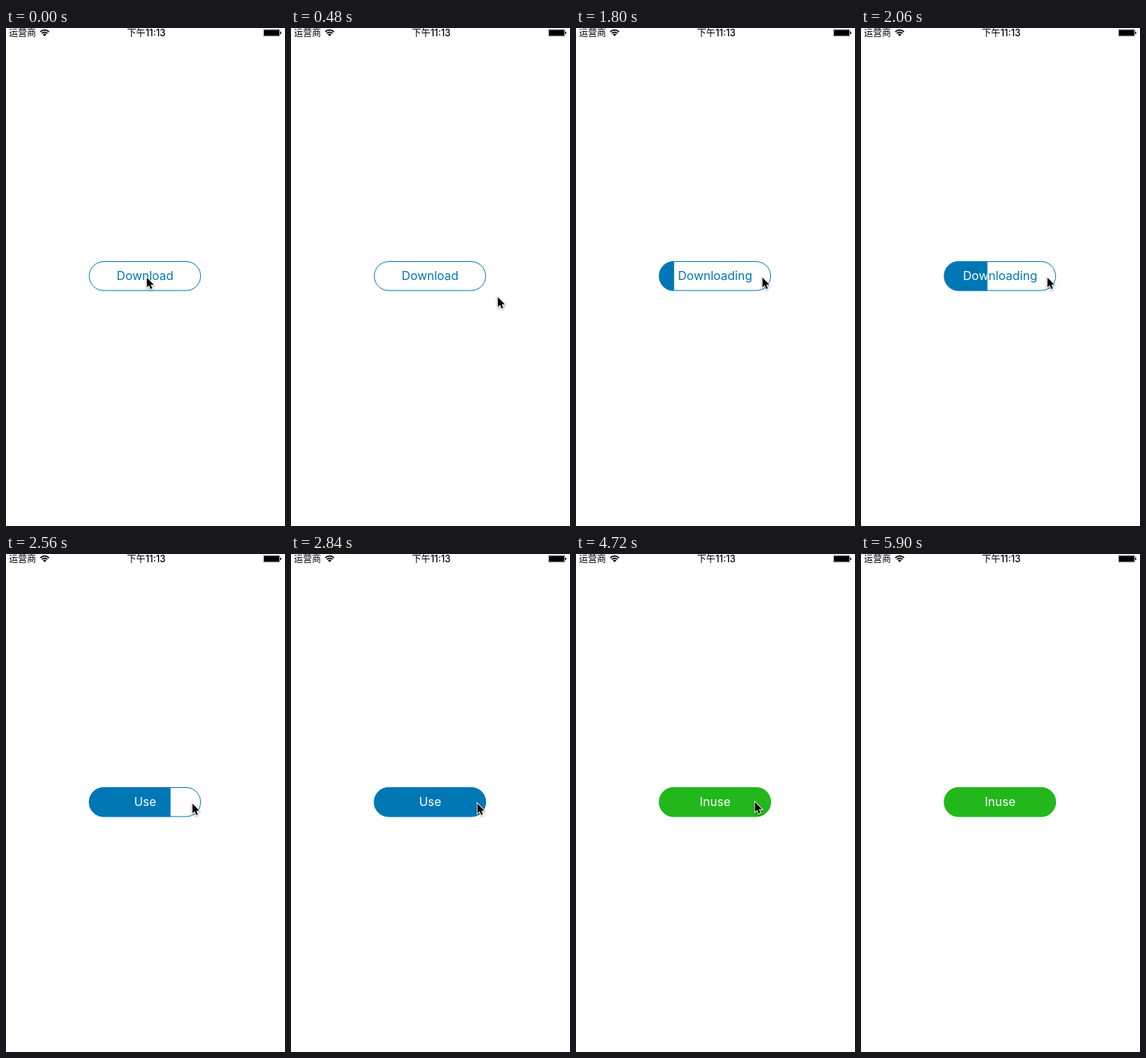
Write an HTML page with a canvas that moves like this. It is 372x662 px and loops after 6640 ms.

```html
<!DOCTYPE html>
<html lang="zh">
<head>
<meta charset="utf-8">
<style>
  html, body { margin: 0; width: 100%; height: 100%; overflow: hidden; background: #fff; }
  canvas { display: block; }
</style>
</head>
<body>
<canvas id="stage" width="372" height="662"></canvas>
<script>
const ctx = document.getElementById('stage').getContext('2d');
const LOOP = 6640, STEP = 20;
const BLUE = '#0077b5', GREEN = '#22b81c';
const SANS = 'Inter, "Noto Sans CJK SC", "Noto Sans CJK", sans-serif';
const LEFT = 110.5, TOP = 310, WIDTH = 149.5, HEIGHT = 39.5;
const ARROW = new Path2D('M0 0V13L3 10.3 5 15.2 7.2 14.3 5.2 9.5H9.3Z');

const { PI, sin, cos, min, max } = Math;
const between = (t, from, to) => min(1, max(0, (t - from) / (to - from)));

// The pointer sways, darts across the button, drops below it, then leaves.
function pointerAt(t) {
  const sway = min(t, 1046) * 2 * PI / 809;
  const dip = sin(PI * between(t, 0, 600));
  const dart = between(t, 3520, 3700), arc = sin(PI * dart);
  const drop = between(t, 5200, 5300);
  const exit = between(t, 5620, 5740);
  return [
    235.8 - 48 * cos(sway) - 10 * dart - 55 * arc - 3 * drop + 142 * exit,
    331.8 + 44 * dip - 2 * dart - 14 * arc + 35 * drop - 77 * exit
  ];
}

// Quick start, soft landing
const easeOut = k => 1 - (1 - k) ** 2.25;

function stateAt(t) {
  if (t < 1660) return ['Download', 0, BLUE];
  if (t < 2340) return ['Downloading', (min(t, 2300) - 1660) / 1030, BLUE];
  if (t < 4680) return ['Use', easeOut(between(t, 2340, 2840)), BLUE];
  return ['Inuse', 1, GREEN];
}

function text(str, x, y, font, color, align) {
  ctx.font = font + ' ' + SANS;
  ctx.fillStyle = color;
  ctx.textAlign = align;
  ctx.fillText(str, x, y);
}

function pill(inset) {
  ctx.beginPath();
  ctx.roundRect(LEFT + inset, TOP + inset, WIDTH - 2 * inset, HEIGHT - 2 * inset, HEIGHT / 2 - inset);
}

function drawStatusBar() {
  text('运营商', 4, 11, '12px', '#000', 'left');
  text('下午11:13', 187, 11, '500 12.4px', '#000', 'center');

  // Signal: a wedge cut into bands
  for (const [r, color] of [[9, '#000'], [7.2, '#fff'], [6, '#000'], [4.3, '#fff'], [3.2, '#000']]) {
    ctx.fillStyle = color;
    ctx.beginPath();
    ctx.moveTo(51.5, 10.8);
    ctx.arc(51.5, 10.8, r, -PI * .75, -PI * .25);
    ctx.fill();
  }

  ctx.strokeStyle = '#777';
  ctx.lineWidth = .6;
  ctx.strokeRect(343.2, 1.9, 21.8, 9);
  ctx.fillRect(344, 2.5, 20.4, 7.8);
  ctx.fillRect(365.6, 4.8, 1.4, 3.2);
}

function drawButton(t) {
  const [label, progress, color] = stateAt(t);
  const caption = c => text(label, 185.5, 335, '16px', c, 'center');
  ctx.strokeStyle = color;
  ctx.lineWidth = 1;
  pill(.5);
  ctx.stroke();
  caption(color);

  ctx.save();
  ctx.beginPath();
  ctx.rect(LEFT, TOP, WIDTH * progress, HEIGHT);
  ctx.clip();
  ctx.fillStyle = color;
  pill(0);
  ctx.fill();
  caption('#fff');
  ctx.restore();
}

function drawPointer(t) {
  if (t >= 5740) return;
  ctx.save();
  ctx.translate(...pointerAt(t));
  ctx.lineWidth = 1.8;
  ctx.strokeStyle = '#fff';
  ctx.shadowColor = 'rgba(0,0,0,.4)';
  ctx.shadowBlur = 3;
  ctx.shadowOffsetY = 1;
  ctx.stroke(ARROW);
  ctx.shadowColor = 'transparent';
  ctx.fillStyle = '#000';
  ctx.fill(ARROW);
  ctx.restore();
}

let start;
function frame(now) {
  start ??= now;
  const t = Math.floor((now - start) % LOOP / STEP) * STEP;
  ctx.fillStyle = '#fff';
  ctx.fillRect(0, 0, 372, 662);
  drawStatusBar();
  drawButton(t);
  drawPointer(t);
  requestAnimationFrame(frame);
}
requestAnimationFrame(frame);
</script>
</body>
</html>
```
